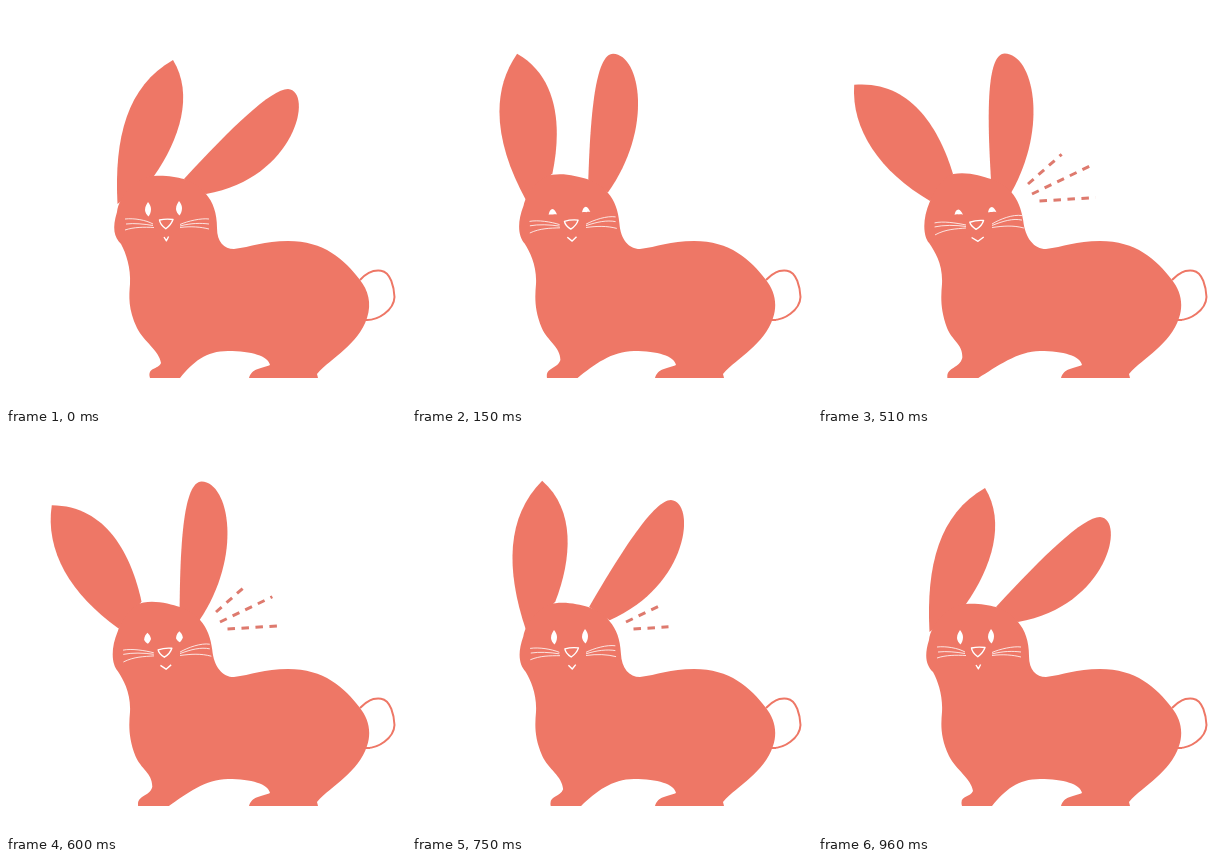
An HTML page that plays this animation: 400 by 400 pixels, repeating every 1.29 s.

```html
<!DOCTYPE html>
<html lang="en">
<head>
<meta charset="utf-8">
<title>Listening rabbit</title>
<style>
  html, body { margin: 0; height: 100%; overflow: hidden; background: #fff; }
  svg { display: block; width: 100vw; height: 100vh; }
  .coat { fill: #ee7766; }
  .tail { fill: none; stroke: #ee7766; stroke-width: 2; }
  .sound { fill: none; stroke: #de7a6e; stroke-width: 3; }
  .eye { fill: #fff; }
  .line { fill: none; stroke: #fff; stroke-width: 1.4; stroke-linejoin: round; }
  .whisker { fill: none; stroke: #fff; stroke-width: .8; }
</style>
</head>
<body>
<svg id="stage" viewBox="0 0 400 400"></svg>
<script>
const LOOP = 1290, STEP = 30;
const UP_END = 270, DOWN_START = 480, DOWN_END = 960;

const BACK = 'M228 243C245 241 258 235 282 235C318 235 338 253 354 274C362 284 366 297 361 312' +
  'C352 339 326 351 311 368L312 372L243 372C246 362 255 363 264 359C262 350 246 345 222 345';

// Each pair holds the resting and the alert pose.
const FRONT = [
  'C200 345 187 356 174 372L144 372C141 361 152 364 155 357C153 344 138 336 131 322' +
  'C122 303 123 290 124 278C125 262 120 247 115 238C108 231 106 222 111 206' +
  'C113 190 130 170 148 170C158 169 170 171 178 173C186 176 196 181 200 188' +
  'C207 196 211 207 211 222C211 236 218 243 228 243Z',
  'C200 345 178 361 160 372L129 372C128 361 141 363 144 352C145 338 134 335 129 322' +
  'C122 303 123 290 124 278C125 258 117 246 111 237C105 230 104 213 112 195' +
  'C116 185 125 170 135 168C148 165 164 170 173 173C181 176 189 180 193 186' +
  'C200 194 203 203 205 214C207 232 216 243 228 243Z'
];

const LEFT_EAR = {
  pivot: [125, 180], angles: [18.4, -41.4],
  shapes: [
    'M111.5 198C108 132 121 80 167 54C188 88 174 133 148 170Z',
    'M112 195C62 166 33 124 36 79C92 74 121 122 135 168Z'
  ]
};
const RIGHT_EAR = {
  pivot: [185, 182], angles: [46, 0],
  shapes: [
    'M178 173C225 122 265 83 282 83C308 85 290 172 200 188Z',
    'M173 174C169 110 168 48 186.5 47.5C215 48 231 120 193 187Z'
  ]
};

const EYE = [
  'M139 204C139 200 141 198 142 196C143.5 198 145 200 145 203C145 206 144 209 142.5 210.5C141 209 139 206.5 139 204Z',
  'M136 210C137 206 138 205 140 205C142 205 143.5 207 145 210C143 208.5 142 208 140.5 208C139 208 137 209 136 210Z'
];
const NOSE = [
  'M153.5 214Q160 212.5 167 213.5Q165 219 159.8 222.8Q154 218.5 153.5 214Z',
  'M151.8 216.3Q158 214 165.5 214.5Q164 220 158 223.3Q152.5 220 151.8 216.3Z'
];
const MOUTH = ['M158 231L160.4 234.8L162.6 230.5', 'M153.5 231.5L160 235.3L165.8 231'];
const WHISKERS = [
  ['M119 213C128 212 140 214 147 218', 'M116.5 217C125 215 138 217 148 219'],
  ['M120 218C128 217 138 218 147 219.5', 'M116.5 221C125 219 138 219 148 220.5'],
  ['M119 224C128 221 138 221 148 221.5', 'M117 229C128 223 138 223 148 222'],
  ['M174 218.5C182 215 195 212 203 213', 'M174 218C182 213 195 208 204 209.5'],
  ['M174 220C185 217 195 217 203 218', 'M174 219.5C185 215 195 212 204 214'],
  ['M174 221.5C185 220 195 221 203 223', 'M174 221.5C185 220 195 219 206 222']
];
const SOUNDS = [[210, 178, 244, 148], [214, 188, 272, 160], [221.5, 195, 278, 191.5]];

const stage = document.getElementById('stage');
const lerp = (a, b, p) => a + (b - a) * p;
const clamp = x => Math.min(1, Math.max(0, x));
const NUMBER = /-?\d+(\.\d+)?/g;

function add(cls, d = '') {
  const el = document.createElementNS('http://www.w3.org/2000/svg', 'path');
  el.setAttribute('class', cls);
  el.setAttribute('d', d);
  stage.append(el);
  return el;
}

function mix([a, b], p) {
  const goal = b.match(NUMBER);
  let i = 0;
  return a.replace(NUMBER, n => lerp(+n, +goal[i++], p).toFixed(2));
}

// Rewrites a path relative to a pivot, turned upright.
function upright(d, [px, py], angle) {
  const r = -angle * Math.PI / 180, c = Math.cos(r), s = Math.sin(r);
  return d.replace(/(-?[\d.]+) (-?[\d.]+)/g, (_, x, y) => {
    const dx = x - px, dy = y - py;
    return (dx * c - dy * s).toFixed(2) + ' ' + (dx * s + dy * c).toFixed(2);
  });
}

// S-curve from 0 to 1: k sets the steepness, c shifts the middle.
function ease(x, k, c) {
  const a = x ** k, b = c * (1 - x) ** k;
  return a / (a + b);
}

const tail = add('tail', 'M354 274C362 265 370 264 375 264.7C385 266 388 282 388.5 291C388 304 372 315 359 314');
const sounds = SOUNDS.map(() => add('sound'));
sounds.forEach(el => el.setAttribute('stroke-dasharray', '7.5 6.5'));
const ears = [LEFT_EAR, RIGHT_EAR].map(ear => {
  const local = ear.shapes.map((d, i) => upright(d, ear.pivot, ear.angles[i]));
  return { ...ear, local, el: add('coat') };
});
const body = add('coat');
const eyes = [add('eye'), add('eye')];
const nose = add('line'), mouth = add('line');
const whiskers = WHISKERS.map(() => add('whisker'));

function pose(t) {
  if (t < UP_END) {
    const u = t / UP_END;
    return {
      body: ease(u, 1.5, .93), left: ease(u, 2, 1.9), right: ease(u, 1.8, .2),
      eye: clamp(u * 1.4), sound: clamp((t - 150) / 120), sway: 10 * u * (1 - u)
    };
  }
  const v = clamp((t - DOWN_START) / (DOWN_END - DOWN_START));
  const ear = 1 - ease(v, 2.46, .69);
  return {
    body: 1 - ease(v, 1.45, .78), left: ear, right: ear,
    eye: 1 - clamp((t - DOWN_START) / 170), sound: 1 - v ** 1.68, sway: 0
  };
}

function drawEar({ pivot, angles, local, el }, p, sway) {
  el.setAttribute('d', mix(local, p));
  el.setAttribute('transform',
    `translate(${pivot[0] + sway} ${pivot[1]}) rotate(${lerp(...angles, p)})`);
}

function draw(t) {
  const p = pose(t);
  body.setAttribute('d', BACK + mix(FRONT, p.body));
  drawEar(ears[0], p.left, 0);
  drawEar(ears[1], p.right, p.sway);
  eyes.forEach(el => el.setAttribute('d', mix(EYE, p.eye)));
  eyes[1].setAttribute('transform', `translate(${lerp(31, 34, p.eye)} ${lerp(-1, -2.7, p.eye)})`);
  nose.setAttribute('d', mix(NOSE, p.body));
  mouth.setAttribute('d', mix(MOUTH, p.body));
  whiskers.forEach((el, i) => el.setAttribute('d', mix(WHISKERS[i], p.body)));
  sounds.forEach((el, i) => {
    const [x, y, x2, y2] = SOUNDS[i];
    el.setAttribute('d', p.sound > 0
      ? `M${x} ${y}L${lerp(x, x2, p.sound)} ${lerp(y, y2, p.sound)}` : '');
  });
}

function tick() {
  const t = performance.now() % LOOP;
  draw(Math.floor(t / STEP) * STEP);
  requestAnimationFrame(tick);
}
tick();
</script>
</body>
</html>
```
